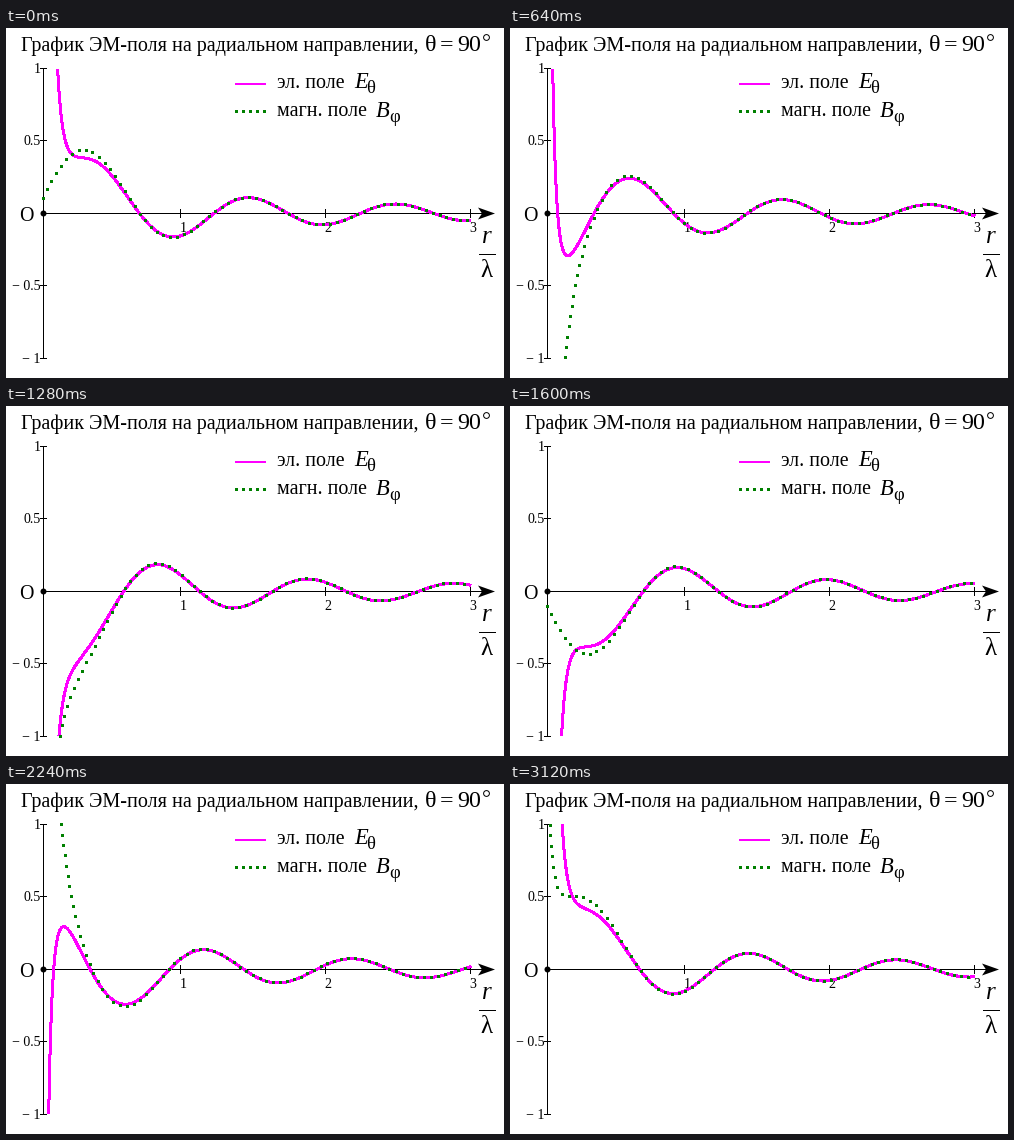
Recreate the animation shown at these times as a matplotlib script. Size 498x350 px, loop 3.2 s.

```python
import numpy as np
import matplotlib.pyplot as plt
from matplotlib.animation import FuncAnimation
from matplotlib.patches import Circle, Polygon

W, H, DPI = 498, 350, 64
FRAMES, INTERVAL = 40, 80
UNIT = 145                  # pixels per axis unit
X0, Y0 = 29.9, 185.25       # pixel position of r = 0, field = 0
AXIS_X, AXIS_Y = 37.5, 185.5
DOT_X, DOT_Y = 7.0, 10.5    # dot pitch along flat and steep runs
MAGENTA, GREEN = "#ff00ff", "#008000"

plt.rcParams["font.family"] = ["Liberation Serif", "DejaVu Serif"]


def px(n):
    return n * 72 / DPI


fig = plt.figure(figsize=(W / DPI, H / DPI), dpi=DPI, facecolor="white")
ax = fig.add_axes([0, 0, 1, 1])
ax.set_xlim(0, W)
ax.set_ylim(H, 0)
ax.axis("off")


def text(x, y, s, size, style="normal", ha="left"):
    ax.text(x, y, s, fontsize=px(size), style=style, ha=ha, va="baseline")


def line(xs, ys, width=1, color="black", **kw):
    return ax.plot(xs, ys, color=color, lw=px(width), snap=False,
                   solid_capstyle="butt", **kw)[0]


def dots(xs, ys):
    return ax.plot(xs, ys, "s", color=GREEN, ms=px(3), mew=0, zorder=4)[0]


def draw_axes():
    line([AXIS_X] * 2, [40, 331])
    line([37, 478], [AXIS_Y] * 2)
    for v, label in ((1, "1"), (0.5, "0.5"), (-0.5, "− 0.5"), (-1, "− 1")):
        y = np.floor(Y0 - UNIT * v) + 0.5
        line([34, 41], [y, y])
        text(34.5, y + 4.5, label, 14, ha="right")
    for r in (1, 2, 3):
        x = np.floor(X0 + UNIT * r) + 0.5
        line([x, x], [181, 190])
        text(x + 2.5, 204, str(r), 14, ha="center")
    ax.add_patch(Polygon([(489, AXIS_Y), (472, AXIS_Y - 6),
                          (476, AXIS_Y), (472, AXIS_Y + 6)],
                         fc="black", ec="none", zorder=5))
    ax.add_patch(Circle((AXIS_X, AXIS_Y), 3, fc="black", ec="none", zorder=5))
    text(13.5, 193, "O", 20)
    text(475.5, 215, "r", 25, "italic")
    line([473, 490], [226.5, 226.5])
    text(474.5, 249, "λ", 25)


def draw_labels():
    text(15, 23, "График ЭМ-поля на радиальном направлении,", 20.1)
    text(418.5, 23, "θ", 24)
    text(434, 23, "=", 24)
    text(451.5, 23, "90", 24)
    ax.add_patch(Circle((480.5, 9.5), 2.9, fc="none", ec="black", lw=px(1)))

    line([229, 260], [56, 56], 2, MAGENTA, aa=False)
    text(271, 60, "эл. поле", 20)
    text(348, 60.5, "E", 22.5, "italic")
    text(360.5, 65, "θ", 18.5)

    dots(230 + 7 * np.arange(5), np.full(5, 83))
    text(271, 88, "магн. поле", 20)
    text(369.5, 89, "B", 22.5, "italic")
    text(383.5, 94, "φ", 18.5)


draw_axes()
draw_labels()

r = np.linspace(0.05, 3, 6000)
rho = 2 * np.pi * r
xs = X0 + UNIT * r
e_line = line([], [], 2, MAGENTA, aa=False, zorder=3)
b_dots = dots([], [])


def fields(tau):
    """Dipole fields at the equator, in units of the near-field scale."""
    c, s = np.cos(rho - tau), np.sin(rho - tau)
    b = s / rho**2 - c / rho
    return b + c / rho**3, b


def update(i):
    e, b = fields(2 * np.pi * i / FRAMES)
    e_line.set_data(xs, np.where(np.abs(e) <= 1, Y0 - UNIT * e, np.nan))

    shown = np.abs(b) <= 1
    bx, by = xs[shown], Y0 - UNIT * b[shown]
    steps = np.hypot(np.diff(bx) / DOT_X, np.diff(by) / DOT_Y)
    path = np.concatenate(([0], np.cumsum(steps)))
    k = np.arange(int(path[-1]) + 1)
    b_dots.set_data(np.floor(np.interp(k, path, bx)),
                    np.floor(np.interp(k, path, by)))
    return e_line, b_dots


anim = FuncAnimation(fig, update, frames=FRAMES, interval=INTERVAL,
                     repeat=True, repeat_delay=0)
plt.show()
```
